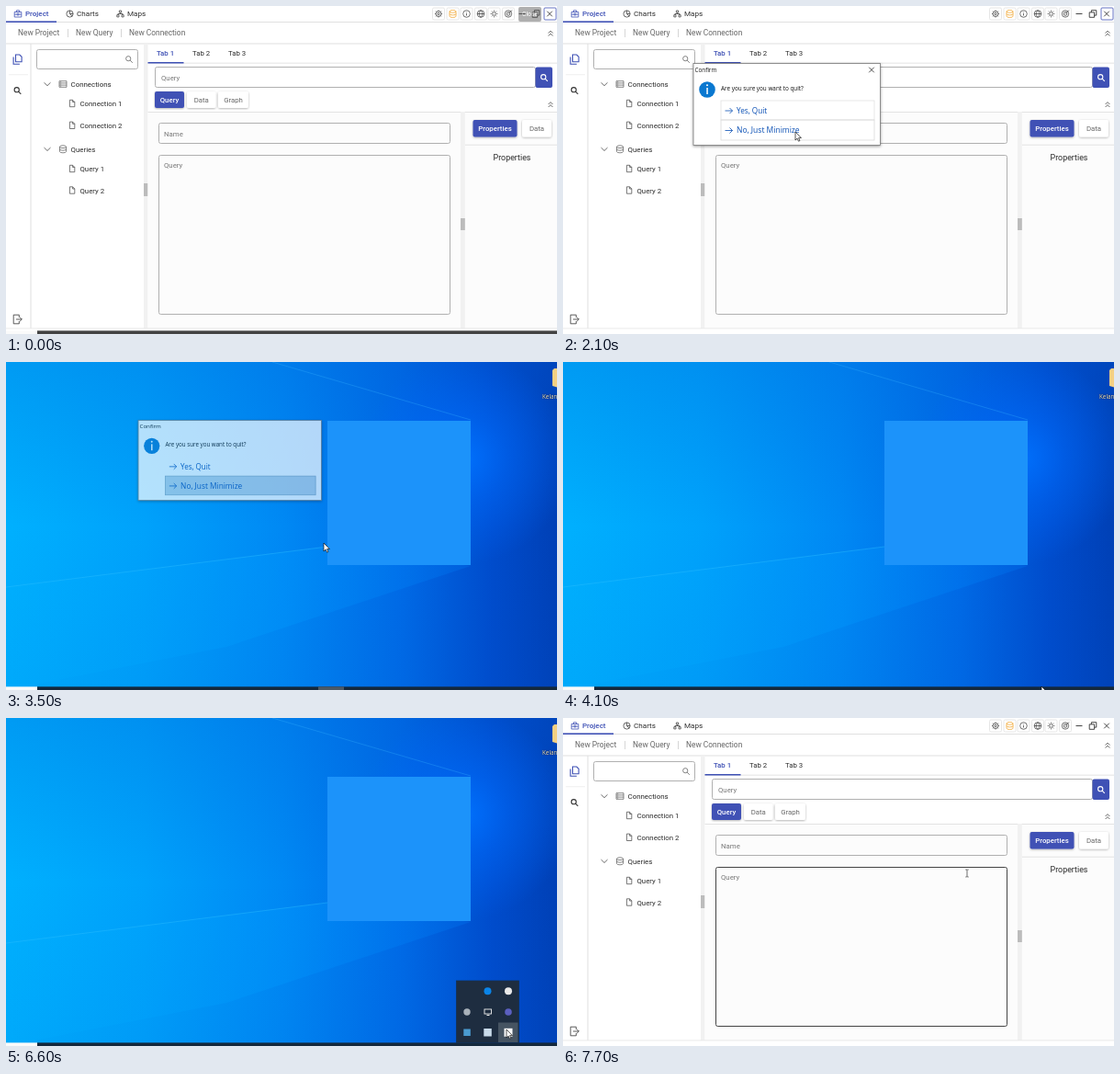
An HTML page that plays this animation: 600x357 px, repeating every 7800 ms.

```html
<!DOCTYPE html>
<html lang="en">
<head>
<meta charset="utf-8">
<title>Minimize to tray</title>
<style>
html, body { margin: 0; width: 100%; height: 100%; overflow: hidden; background: #fff; }
svg { display: block; width: 600px; height: 357px; }
.ui { font-family: Roboto, sans-serif; }
.os { font-family: "Open Sans", sans-serif; }
</style>
</head>
<body>
<svg id="stage" viewBox="0 0 600 357" xmlns="http://www.w3.org/2000/svg"></svg>
<script>
const LOOP = 7800, STEP = 100;
const BLUE = "#3f51b5", INK = "#2b2b2b", GREY = "#666", LINE = "#e0e0e0";

// Markup helpers
const rect = (x, y, w, h, fill, extra = "") =>
  `<rect x="${x}" y="${y}" width="${w}" height="${h}" fill="${fill}" ${extra}/>`;
const frame = (x, y, w, h, stroke, extra = "") =>
  rect(x, y, w, h, "none", `stroke="${stroke}" ${extra}`);
const text = (x, mid, str, size = 7.8, fill = INK, extra = "") =>
  `<text x="${x}" y="${mid + size * 0.35}" font-size="${size}" fill="${fill}" ${extra}>${str}</text>`;
const icon = (x, y, d, color = "#444", width = 0.8) =>
  `<path transform="translate(${x} ${y})" d="${d}" fill="none" stroke="${color}" stroke-width="${width}"/>`;
const dot = (x, y, r, fill) => `<circle cx="${x}" cy="${y}" r="${r}" fill="${fill}"/>`;
const group = (id, body, extra = "") => `<g id="${id}" ${extra}>${body}</g>`;
const ring = r => `M${-r} 0a${r} ${r} 0 1 0 ${2 * r} 0a${r} ${r} 0 1 0 ${-2 * r} 0`;
const rays = (n, a, b) => Array.from({ length: n }, (_, i) => {
  const c = Math.cos(i * 2 * Math.PI / n), s = Math.sin(i * 2 * Math.PI / n);
  return `M${(c * a).toFixed(2)} ${(s * a).toFixed(2)}L${(c * b).toFixed(2)} ${(s * b).toFixed(2)}`;
}).join("");

const ICON = {
  file: "M-2.6-3.7H.6L2.8-1.5V3.7H-2.6ZM.6-3.7V-1.5H2.8",
  files: "M-2-5H2.3L4.6-2.7V2.8H-2ZM-4.4-2.5V5.2H2.4",
  lens: "M-3.4-.8a2.6 2.6 0 1 0 5.2 0a2.6 2.6 0 1 0-5.2 0M1.1 1.1L3.8 3.8",
  down: "M-3.5-1.7L0 1.7L3.5-1.7",
  up2: "M-2.4 0L0-2.4L2.4 0M-2.4 3L0 .6L2.4 3",
  server: "M-4-3.3H4V3.3H-4ZM-4-1.1H4M-4 1.1H4M-2.8-2.2H-1.8M-2.8 0H-1.8M-2.8 2.2H-1.8",
  data: "M-3.5-2.6a3.5 1.4 0 1 0 7 0a3.5 1.4 0 1 0-7 0V2.6a3.5 1.4 0 0 0 7 0V-2.6M-3.5 0a3.5 1.4 0 0 0 7 0",
  exit: "M1.8-2V-4.8H-4.3V4.8H1.8V2M-1.5 0H4.8M2.6-2.2L4.8 0L2.6 2.2",
  bag: "M-3.8-2H3.8V3.5H-3.8ZM-1.5-2V-3.7H1.5V-2M-3.8.6H-.8M.8.6H3.8M-.8-.3H.8V1.5H-.8Z",
  pie: ring(3.6) + "M0-3.6V0L2.6 2.6M0 0H3.6",
  tree: "M-1.1-3.5H1.1V-1.3H-1.1ZM-3.7 1.2H-1.5V3.4H-3.7ZM1.5 1.2H3.7V3.4H1.5ZM0-1.3V0M-2.6 1.2V0H2.6V1.2",
  gear: ring(3) + ring(1.2) + rays(8, 3, 4),
  info: ring(3.8) + "M0-.5V2M0-2V-1.3",
  globe: ring(3.8) + "M-3.8 0H3.8M0-3.8C-2.3-1.5-2.3 1.5 0 3.8C2.3 1.5 2.3-1.5 0-3.8",
  sun: ring(1.8) + rays(8, 2.7, 3.9),
  goal: ring(3.7) + ring(1.8) + "M0 0L4-4",
  min: "M-3.5 0H3.5",
  restore: "M-3.8-1.6H1.6V3.8H-3.8ZM-1.6-1.6V-3.8H3.8V1.6H1.6",
  close: "M-2.8-2.8L2.8 2.8M2.8-2.8L-2.8 2.8",
  arrow: "M-4 0H4M1-3L4 0L1 3",
  caret: "M-1.7-4H-.4L0-3.6L.4-4H1.7M0-3.6V3.6M-1.7 4H-.4L0 3.6L.4 4H1.7"
};

const button = (x, y, w, h, label, on) =>
  rect(x, y, w, h, on ? BLUE : "#fff", 'rx="2" filter="url(#lift)"') +
  text(x + w / 2, y + h / 2, label, 7.8, on ? "#fff" : GREY,
    `text-anchor="middle" ${on ? 'font-weight="500"' : ""}`);

function header() {
  const tools = [["gear", 471], ["data", 486.5, "#f0a020"], ["info", 501.5], ["globe", 517],
    ["sun", 531.5], ["goal", 547], ["min", 562], ["restore", 577], ["close", 592]];
  return rect(0, 17, 600, 1, LINE) + rect(0, 16.4, 55, 1.6, BLUE) +
    icon(13, 8.5, ICON.bag, BLUE) + text(21, 8.5, "Project", 8, BLUE, 'font-weight="500"') +
    icon(69.5, 8.5, ICON.pie) + text(77, 8.5, "Charts", 8.1) +
    icon(124.5, 8.5, ICON.tree) + text(132, 8.5, "Maps", 8.1) +
    tools.map(([name, x, color], i) =>
      (i < 6 ? frame(x - 6.5, 2, 13, 13, LINE, 'rx="1.5" stroke-width=".8"') : "") +
      icon(x, 8.5, ICON[name], color || "#333", i < 6 ? 0.7 : 0.9)).join("") +
    group("focus", frame(586, 2, 13, 13, BLUE, 'rx="1" stroke-width=".8"')) +
    text(13, 29.5, "New Project", 8.4, GREY) + text(76, 29.5, "New Query", 8.4, GREY) +
    text(134, 29.5, "New Connection", 8.4, GREY) +
    rect(67, 25, .8, 9, "#ccc") + rect(125, 25, .8, 9, "#ccc") +
    icon(593, 29.5, ICON.up2) + rect(0, 40.5, 600, 1, LINE);
}

function sidebar() {
  const branch = (y, name, label) => icon(45, y, ICON.down, "#444") +
    icon(62, y, ICON[name], "#555", 0.7) + text(70.5, y, label, 7.9);
  const leaf = (y, label) => icon(72, y - .5, ICON.file, "#555") + text(80.5, y, label, 7.8);
  return rect(26.5, 41, 1, 310, LINE) + rect(3, 74.5, 21, .7, "#e8e8e8") +
    icon(12.5, 58, ICON.files, BLUE, 1.1) +
    icon(12.5, 92, ICON.lens, "#333", 1.1) + icon(12.5, 341, ICON.exit, "#333") +
    frame(33.5, 47.5, 110, 21, "#b0b0b0", 'rx="2"') + icon(134, 58, ICON.lens, "#666") +
    branch(85, "server", "Connections") + leaf(106.5, "Connection 1") + leaf(130.3, "Connection 2") +
    branch(155.8, "data", "Queries") + leaf(177.5, "Query 1") + leaf(201, "Query 2") +
    rect(150, 41, 4.5, 310, "#f1f1f1") + rect(150, 193, 4.5, 14, "#bcbcbc");
}

function workspace() {
  return text(164, 51.5, "Tab 1", 7.8, BLUE, 'font-weight="500"') + text(203, 51.5, "Tab 2", 7.8) +
    text(242, 51.5, "Tab 3", 7.8) + rect(154.5, 61.7, 446, .9, LINE) + rect(154.5, 61, 39, 1.5, BLUE) +
    frame(162.5, 66.5, 414, 22, "#b0b0b0", 'rx="2"') + text(169, 77.8, "Query", 7.8, "#777") +
    rect(576.5, 66.5, 18.5, 22.5, BLUE, 'rx="2"') + icon(586, 78, ICON.lens, "#fff", 1.1) +
    button(162, 93, 32, 18, "Query", true) + button(197, 93, 31.5, 18, "Data") +
    button(231, 93, 33, 18, "Graph") + icon(593, 107, ICON.up2) +
    rect(154.5, 115, 446, 236, "#fcfcfc") + rect(154.5, 115, 446, .9, LINE) +
    frame(166.5, 127.5, 317, 22, "#b0b0b0", 'rx="2"') + text(172, 139, "Name", 7.8, "#777") +
    `<rect id="area" x="166.5" y="162.5" width="317" height="173" rx="2" fill="none"/>` +
    text(172, 173.5, "Query", 7.8, "#777") +
    rect(495, 115, 4.8, 236, "#f1f1f1") + rect(495, 231, 4.8, 13, "#bcbcbc") +
    button(508.5, 124, 48, 18.5, "Properties", true) + button(562, 124, 32, 18.5, "Data") +
    rect(500, 150.7, 100, .9, LINE) +
    text(551, 165, "Properties", 8.9, INK, 'text-anchor="middle"') +
    rect(0, 350.5, 600, .9, "#e8e8e8");
}

function dialog() {
  return rect(142, 62.5, 203.5, 89, "#fff", 'stroke="#777" stroke-width=".8" filter="url(#drop)"') +
    text(143.5, 69.5, "Confirm", 6.3, "#111") +
    dot(157, 91, 8.8, "#0a78d0") + rect(156.3, 89, 1.5, 7, "#fff") + dot(157, 86.3, 1, "#fff") +
    text(172, 89.5, "Are you sure you want to quit?", 6.35, "#111") +
    group("idle", icon(336, 69.5, ICON.close, "#222") +
      frame(172, 103, 167, 21, "#e0e0e0", 'stroke-width=".8"') +
      frame(172, 124, 167, 22, "#dadada", 'stroke-width=".8"')) +
    group("pressed", rect(172, 124.5, 167, 21, "#bcd2e4", 'stroke="#8fa9be" stroke-width=".8"')) +
    icon(180.5, 114, ICON.arrow, "#0a4fb4") + text(189, 114, "Yes, Quit", 8.2, "#0a4fb4") +
    icon(180.5, 135.5, ICON.arrow, "#0a4fb4") + text(189, 135.5, "No, Just Minimize", 8.5, "#0a4fb4");
}

function desktop() {
  return rect(0, 0, 600, 357, "url(#sky)") + rect(0, 0, 600, 357, "url(#shade)") +
    rect(0, 0, 600, 357, "url(#glow)") +
    `<path d="M0 245L350 201L506 222L240 310L0 357Z" fill="url(#beam)"/>
     <path d="M290 0L506 63" stroke="#38b4ff" stroke-width=".7" opacity=".45"/>
     <path d="M0 245L350 201" stroke="#30c0ff" stroke-width="1" opacity=".4"/>` +
    rect(350, 64, 156, 157, "#1c93fa") +
    `<path d="M595 9L597 7H602V28L595 26Z" fill="#f5d083"/>` +
    text(584, 37.8, "Kelan Mo", 6.3, "#f6e6c4", 'class="os" style="text-shadow:0 0 1.5px #000"');
}

function tray() {
  return rect(490.5, 286, 68, 68, "#1e2d40", 'stroke="#16304f" stroke-width=".8"') +
    group("tile", rect(536, 331.5, 21.5, 21.5, "#465462")) +
    dot(524.5, 297.3, 4, "#0a84e8") + dot(547, 297.3, 4, "#e9e9e9") +
    dot(502, 320, 3.7, "#a9b2ba") +
    frame(521, 317, 7.5, 5, "#eee", 'stroke-width=".9"') + rect(523.5, 323, 3, 1, "#eee") +
    dot(547, 320, 3.8, "#5b5fc0") + rect(498.3, 338.5, 7.5, 7.5, "#4a9bd0") +
    rect(520.3, 338, 8.5, 8.5, "#c9dbea") + rect(542.5, 337.8, 9, 9, "#fafafa");
}

const stops = list => list.map(([at, color, alpha = 1]) =>
  `<stop offset="${at}" stop-color="${color}" stop-opacity="${alpha}"/>`).join("");

const stage = document.getElementById("stage");
stage.innerHTML = `<defs>
  <linearGradient id="sky">${stops([[0, "#00b0fe"], [.25, "#00a2fb"], [.5, "#0089f4"], [.72, "#006ae6"], [.88, "#004ccc"], [1, "#0040b6"]])}</linearGradient>
  <linearGradient id="shade" x2="0" y2="1">${stops([[0, "#0058d0", .24], [.5, "#0058d0", 0], [1, "#0058d0", .1]])}</linearGradient>
  <radialGradient id="glow" gradientUnits="userSpaceOnUse" cx="500" cy="105" r="115">${stops([[0, "#0072ff", .9], [.4, "#006cff", .5], [1, "#0068ff", 0]])}</radialGradient>
  <linearGradient id="beam">${stops([[0, "#00b4ff", .15], [.6, "#009cff", .3], [1, "#0078f4", .3]])}</linearGradient>
  <filter id="lift" x="-20%" y="-20%" width="140%" height="160%"><feDropShadow dx="0" dy=".8" stdDeviation=".9" flood-opacity=".32"/></filter>
  <filter id="drop" x="-5%" y="-5%" width="110%" height="115%"><feDropShadow dx="0" dy="1" stdDeviation="1.4" flood-opacity=".4"/></filter>
  <clipPath id="above"><rect width="600" height="353.5"/></clipPath>
</defs>` +
  group("desk", desktop()) +
  `<g clip-path="url(#above)">${group("popup", tray())}</g>` +
  group("app", rect(0, 0, 600, 357, "#fff") + header() + sidebar() + workspace(), 'class="ui"') +
  group("tip", rect(558, 1, 25, 16, "#616161", 'rx="2"') +
    text(570.5, 9, "Close", 6.8, "#fff", 'text-anchor="middle"'), 'class="ui"') +
  group("bar", `<rect id="strip" x="34" y="353.4" width="566" height="4"/>` +
    rect(0, 353.4, 34, 4, "#fafafa") + group("task", rect(340, 353.4, 28, 4, "#4c5965"))) +
  group("dialog", dialog(), 'class="os"') +
  group("arrow", `<path d="M0 0V9L2.1 7.1L3.5 10.2L4.9 9.6L3.6 6.6H6.4Z" fill="#fff" stroke="#111" stroke-width=".7"/>`) +
  group("caret", icon(0, 0, ICON.caret, "#333", 0.7));

const part = {};
stage.querySelectorAll("[id]").forEach(el => part[el.id] = el);

// Pointer path: time, x, y
const PATH = [[0, 610, -4], [100, 600, 3], [600, 592, 9], [1300, 592, 9], [1600, 440, 72],
  [2000, 256, 136], [2100, 253, 137], [3300, 253, 137], [3500, 346, 197], [3800, 455, 290],
  [4000, 516, 347], [4100, 521, 353], [4700, 521, 353], [5000, 513, 353], [5400, 532, 349],
  [5800, 545, 339], [6700, 545, 339], [7400, 440, 169], [LOOP, 440, 169]];

const ramp = (t, a, b) => Math.min(1, Math.max(0, (t - a) / (b - a)));
const within = (t, a, b) => t >= a && t < b;

function pointer(t) {
  const i = PATH.findIndex(p => p[0] > t);
  const [t0, x0, y0] = PATH[i - 1], [t1, x1, y1] = PATH[i];
  const k = ramp(t, t0, t1);
  return [x0 + (x1 - x0) * k, y0 + (y1 - y0) * k];
}

function show(id, alpha) {
  part[id].style.display = alpha > 0 ? "" : "none";
  part[id].setAttribute("opacity", +alpha);
}

function draw(t) {
  const [x, y] = pointer(t);
  const back = t >= 6700, away = within(t, 3300, 6700);
  const typing = back && x < 484;

  show("desk", away);
  show("app", back ? 1 : 1 - ramp(t, 3300, 3500));
  show("focus", !back);
  show("tip", t < 1300 ? Math.min(.5 + .5 * ramp(t, 0, 200), 1 - .6 * ramp(t, 1100, 1200)) : 0);
  show("bar", t < 900 || away);
  show("task", within(t, 3400, 4000));
  part.strip.setAttribute("fill", away ? "#14283c" : "#434343");

  const closing = ramp(t, 3400, 3500);
  show("dialog", t < 3600 ? ramp(t, 1200, 1400) * (1 - .3 * closing) : 0);
  part.dialog.setAttribute("transform", `translate(244 107) scale(${1 - .02 * closing}) translate(-244 -107)`);
  show("idle", 1 - closing);
  show("pressed", t >= 3300);

  show("popup", within(t, 4300, 6700));
  part.popup.setAttribute("transform", `translate(0 ${30 * (1 - ramp(t, 4200, 4500)) ** 2})`);
  show("tile", x > 536 && y < 353);

  part.area.setAttribute("stroke", typing ? "#444" : "#b0b0b0");
  show("arrow", t >= 100 && !typing);
  show("caret", typing);
  for (const id of ["arrow", "caret"]) part[id].setAttribute("transform", `translate(${x} ${y})`);
}

function tick() {
  const t = performance.now() % LOOP;
  draw(Math.floor(t / STEP) * STEP);
  requestAnimationFrame(tick);
}
tick();
</script>
</body>
</html>
```
